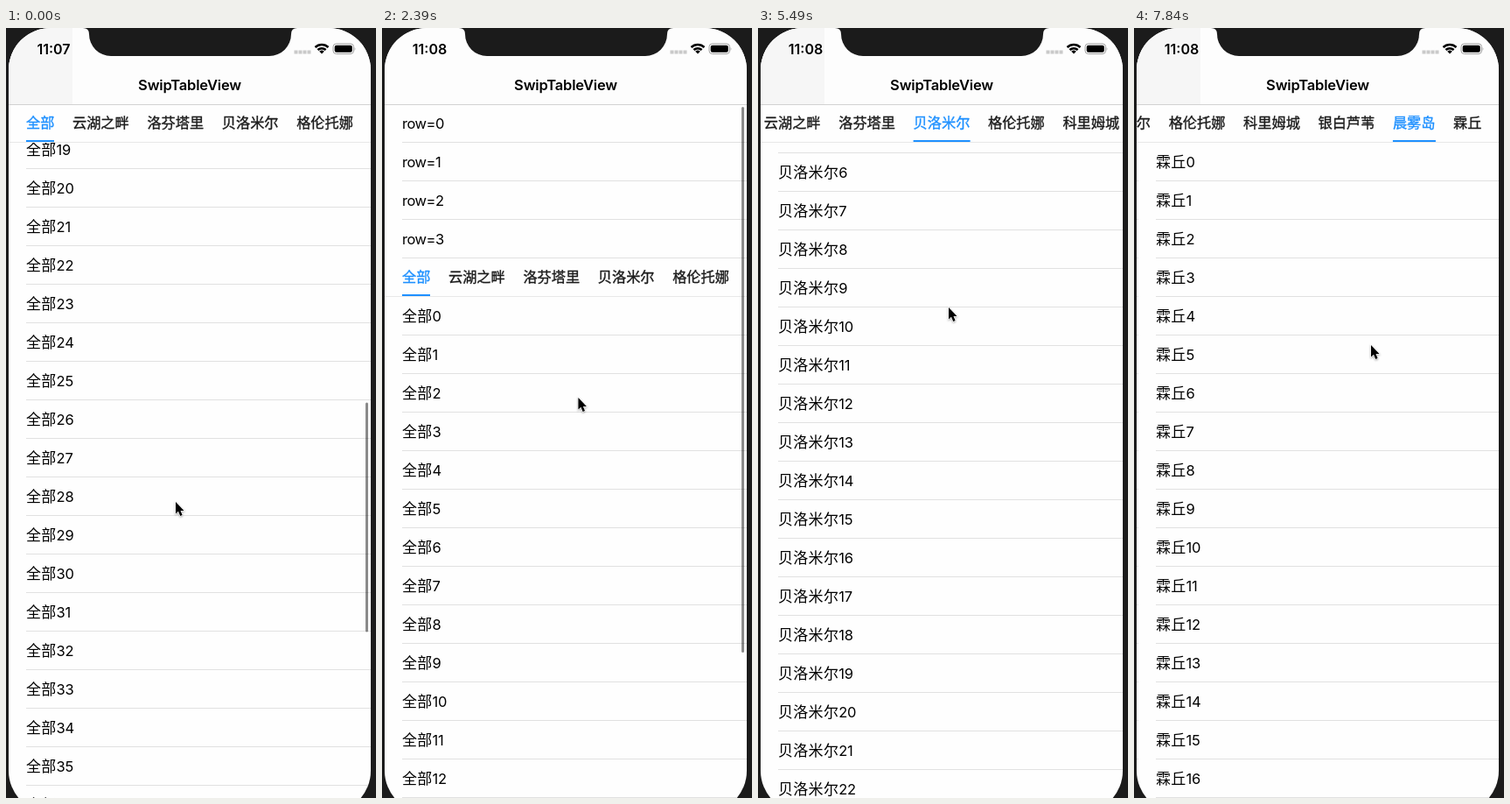
These frames come from a looping animation (423x879 px, 7990 ms). An HTML page:

```html
<!DOCTYPE html>
<html lang="zh-CN">
<head>
<meta charset="utf-8">
<title>SwipTableView</title>
<style>
html, body { margin: 0; width: 100%; height: 100%; overflow: hidden; background: #1b1b1b; }
body { font-family: Inter, "Noto Sans CJK SC", "Noto Sans CJK", sans-serif; color: #000; }
div, svg { position: absolute; }
#stage { left: 0; top: 0; width: 423px; height: 879px; overflow: hidden; }
#screen { left: 3px; top: 0; width: 414px; height: 896px; border-radius: 48px; overflow: hidden; background: #fefefe; }
#header, .page { left: 0; top: 0; width: 414px; }
.row { position: relative; box-sizing: border-box; height: 44px; margin-left: 20px; line-height: 44px;
  border-bottom: 1px solid #e1e1e1; font-size: 17px; letter-spacing: .3px; white-space: nowrap; }
.row span { font-size: 16.5px; letter-spacing: -.25px; }
#header span { letter-spacing: -.5px; }
#bar { left: 0; top: 0; box-sizing: border-box; width: 414px; height: 44px; overflow: hidden;
  background: #fefefe; border-bottom: 1px solid #e8e8e8; }
#strip { left: 0; top: 0; height: 43px; }
.tab { top: 0; font-size: 16.2px; line-height: 43px; color: #1c1c1c; white-space: nowrap; -webkit-text-stroke: .35px; }
.tab.on { color: #1e90ff; }
#line { left: 0; top: 41px; height: 2px; background: #1e90ff; }
#nav { left: 0; top: 0; width: 414px; height: 87px; background: #fdfdfd; border-bottom: 1px solid #d2d2d2; }
#shade { left: 0; top: 0; width: 73px; height: 87px; background: #f6f6f6; }
#title { left: 0; top: 54px; width: 414px; text-align: center; font: 600 16.5px/22px Inter, sans-serif; letter-spacing: -.18px; }
#clock { left: 11px; top: 13px; width: 81px; text-align: center; font: 600 16px/22px Inter, sans-serif; }
#thumb { left: 408px; top: 0; width: 3px; border-radius: 2px; background: #000; opacity: .46; }
#chrome, #cursor { left: 0; top: 0; overflow: visible; }
#cursor { filter: drop-shadow(0 1px 1px rgba(0,0,0,.35)); }
</style>
</head>
<body>
<div id="stage">
  <div id="screen">
    <div id="pages"></div>
    <div id="header"></div>
    <div id="bar"><div id="strip"><div id="line"></div></div></div>
    <div id="thumb"></div>
    <div id="nav">
      <div id="shade"></div>
      <div id="clock"></div>
      <div id="title">SwipTableView</div>
    </div>
  </div>
  <svg id="chrome" width="423" height="879">
    <path fill="#1b1b1b" d="M88 0Q95 0 95 7A25 25 0 0 0 120 32H301A25 25 0 0 0 326 7Q326 0 333 0Z"/>
    <path stroke="#c9c9c9" stroke-width="4" stroke-dasharray="4 1" d="M329.5 27.5h19"/>
    <g fill="none" stroke="#000" stroke-width="2.5">
      <path d="M353.5 22a10.8 10.8 0 0 1 15 0M356.4 25a6.6 6.6 0 0 1 9.2 0"/>
      <path fill="#000" stroke="none" d="M358.2 26.8a4 4 0 0 1 5.6 0L361 29.6Z"/>
    </g>
    <rect x="374" y="18" width="23.5" height="11.5" rx="3.5" fill="none" stroke="#a0a0a0"/>
    <rect x="375.7" y="19.7" width="20.1" height="8.1" rx="2" fill="#000"/>
    <path fill="#a0a0a0" d="M398.7 22q1.6 1.7 0 4Z"/>
  </svg>
  <svg id="cursor" width="12" height="18">
    <path d="M0 0V13.5L3 10.8 5.2 16 7.6 15 5.5 9.9H9.5Z" fill="#000" stroke="#fff" stroke-width="1.2" paint-order="stroke"/>
  </svg>
</div>
<script>
const LOOP = 7990, STEP = 148, LAST_STEP = 53;
const WIDTH = 414, ROW = 44, TOP = 87, PINNED = 4 * ROW;
const CHAR = 16.2, GAP = 20.6, MAX_STRIP = 292.5;
const SWIPE_GAP = 450, SWIPE_DECAY = 89.3, SELECT_DELAY = 510;
const names = ['全部', '云湖之畔', '洛芬塔里', '贝洛米尔', '格伦托娜', '科里姆城', '银白芦苇', '晨雾岛', '霖丘'];

const flicks = [
  { start: 0, duration: 1036, distance: -379 },
  { start: 1036, duration: 1223, distance: -647 },
  { start: 4450, duration: 700, distance: 428 }
];
const burst = (start, count) => Array.from({ length: count }, (_, i) => start + i * SWIPE_GAP);
const swipes = [...burst(2540, 1), ...burst(3600, 2), ...burst(5567, 5)];

// Resting points of the pointer: time, x, y
const pointer = [[0, 194, 541], [1036, 217, 452], [1776, 216, 516], [3256, 237, 281],
  [5476, 218, 319], [6512, 250, 340], [7844, 271, 362]];

const $ = id => document.getElementById(id);
const clamp = (v, lo = 0, hi = 1) => Math.min(hi, Math.max(lo, v));
const easeOut = u => 1 - (1 - clamp(u)) ** 2;
const mix = (a, b, u) => a + (b - a) * u;
const sum = (list, value) => list.reduce((total, item) => total + value(item), 0);
const move = (el, x, y) => { el.style.transform = `translate(${x}px,${y}px)`; };

function add(parent, className, html) {
  const el = document.createElement('div');
  el.className = className;
  el.innerHTML = html;
  return parent.appendChild(el);
}

for (let i = 0; i < 4; i++) add($('header'), 'row', `<span>row=${i}</span>`);

const pages = names.map(name => {
  const page = add($('pages'), 'page', '');
  for (let i = 0; i < 42; i++) add(page, 'row', `${name}<span>${i}</span>`);
  return page;
});

let nextX = 20;
const tabs = names.map(name => {
  const el = add($('strip'), 'tab', name), x = nextX, width = name.length * CHAR;
  el.style.left = x + 'px';
  nextX += width + GAP;
  return { el, x, width, offset: clamp(x + width / 2 - WIDTH / 2, 0, MAX_STRIP) };
});

function drawTabs(t) {
  const index = swipes.filter(start => start + SELECT_DELAY <= t).length;
  const to = tabs[index], from = tabs[Math.max(0, index - 1)];
  const u = index ? easeOut((t - swipes[index - 1] - SELECT_DELAY) / 250) : 1;
  tabs.forEach((tab, i) => tab.el.classList.toggle('on', i === index));
  move($('strip'), -mix(from.offset, to.offset, u), 0);
  move($('line'), mix(from.x, to.x, u), 0);
  $('line').style.width = mix(from.width, to.width, u) + 'px';
}

function drawThumb(t, outer, inner) {
  const pinned = outer >= PINNED, thumb = $('thumb');
  const scrolling = flicks.some(f => t >= f.start && t < f.start + f.duration + 300);
  thumb.style.height = (pinned ? 262 : 623) + 'px';
  thumb.style.visibility = scrolling ? 'visible' : 'hidden';
  move(thumb, 0, pinned ? 133 + inner * .3466 : 90 + outer * .7);
}

function drawPointer(t) {
  const i = clamp(pointer.findIndex(p => p[0] >= t), 1, pointer.length - 1);
  const [t0, x0, y0] = pointer[i - 1], [t1, x1, y1] = pointer[i];
  const u = (t - t0) / (t1 - t0);
  const swiping = swipes.some(start => t >= start && t < start + SWIPE_GAP);
  const sway = swiping ? -40 * Math.sin((t - 6512) / 444 * 2 * Math.PI) : 0;
  move($('cursor'), mix(x0, x1, u) + sway, mix(y0, y1, u));
}

function draw(t) {
  const scroll = Math.round(1026 + sum(flicks, f => f.distance * easeOut((t - f.start) / f.duration)));
  const position = sum(swipes, start => 1 - Math.exp(-Math.max(0, t - start) / SWIPE_DECAY));
  const outer = Math.min(scroll, PINNED), inner = scroll - outer;
  const barY = TOP + PINNED - outer;
  move($('header'), 0, TOP - outer);
  move($('bar'), 0, barY);
  // Three lists are recycled, so every third page shares its scroll offset
  pages.forEach((page, i) => {
    const x = Math.round((i - position) * WIDTH);
    page.style.display = Math.abs(x) < WIDTH ? 'block' : 'none';
    move(page, x, barY + ROW - (i % 3 ? 0 : inner));
  });
  drawTabs(t);
  drawThumb(t, outer, inner);
  drawPointer(t);
  $('shade').style.opacity = scroll > 60 ? 1 : 0;
  $('clock').textContent = t < 600 ? '11:07' : '11:08';
}

const begin = performance.now();
function frame() {
  const t = (performance.now() - begin) % LOOP;
  // The screen refreshes in even steps, each a touch early
  draw(Math.min(LAST_STEP, Math.floor((t + 10) / STEP)) * STEP);
  requestAnimationFrame(frame);
}
frame();
</script>
</body>
</html>
```
